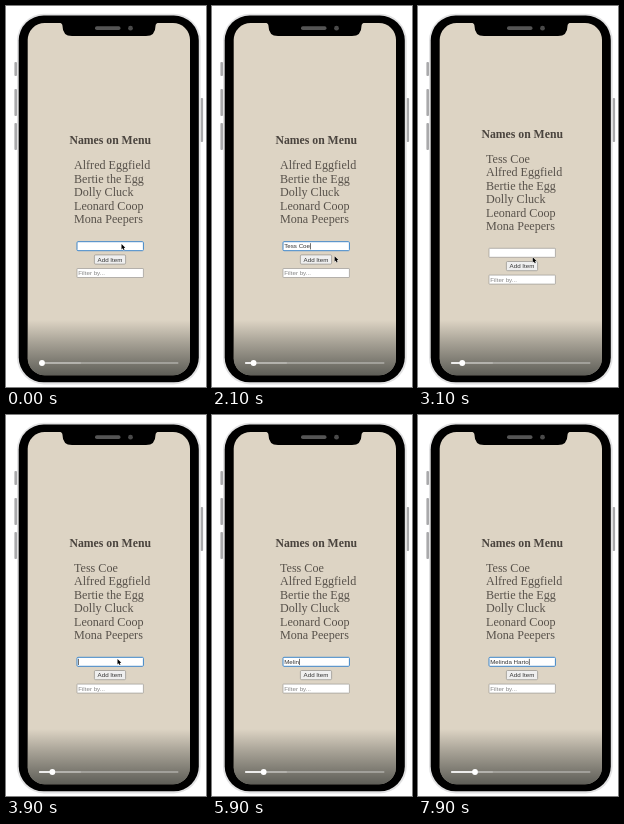
An HTML page with a canvas that plays this animation: 200 px wide and 381 px high, repeating every 8 s.

```html
<!DOCTYPE html>
<html lang="en">
<head>
<meta charset="utf-8">
<title>Names on Menu</title>
<style>
html, body { margin: 0; width: 100%; height: 100%; overflow: hidden; background: #fff; }
canvas { display: block; width: 200px; height: 381px; }
</style>
</head>
<body>
<canvas id="stage"></canvas>
<script>
const W = 200, H = 381, LOOP = 8000, STEP = 100;
const SERIF = '"Liberation Serif", "Times New Roman", serif';
const SANS = '"Liberation Sans", Arial, sans-serif';
const INK = '#58524b', HEAD_INK = '#4a443e';

const canvas = document.getElementById('stage');
const ratio = window.devicePixelRatio || 1;
canvas.width = W * ratio;
canvas.height = H * ratio;
const ctx = canvas.getContext('2d');
ctx.scale(ratio, ratio);

const people = ['Alfred Eggfield', 'Bertie the Egg', 'Dolly Cluck', 'Leonard Coop', 'Mona Peepers'];
const first = { text: 'Tess Coe', keys: [500, 600, 800, 900, 1100, 1300, 1500, 1600] };
const second = {
  text: 'Melinda Harto',
  keys: [4700, 5000, 5300, 5500, 5800, 6000, 6300, 6600, 6900, 7200, 7400, 7600, 7800]
};
const ADDED = 3000, BLUR = 2500, REFOCUS = 3700;

// Pointer stops: time, x, y
const stops = [[0, 115.5, 238], [500, 115.5, 238], [500, 0, -20], [1700, 0, -20],
               [1700, 134, 244], [2000, 124, 250], [2400, 115, 252], [3000, 115, 252],
               [3300, 114, 249], [3600, 111.5, 244], [4600, 111.5, 244]];

function box(x, y, w, h, r, fill) {
  ctx.beginPath();
  ctx.roundRect(x, y, w, h, r);
  ctx.fillStyle = fill;
  ctx.fill();
}

function frame(x, y, w, h, r, color, line) {
  ctx.beginPath();
  ctx.roundRect(x, y, w, h, r);
  ctx.strokeStyle = color;
  ctx.lineWidth = line;
  ctx.stroke();
}

function dot(x, y, r, fill) {
  ctx.beginPath();
  ctx.arc(x, y, r, 0, Math.PI * 2);
  ctx.fillStyle = fill;
  ctx.fill();
}

function label(text, x, y, font, color, align = 'left') {
  ctx.font = font;
  ctx.fillStyle = color;
  ctx.textAlign = align;
  ctx.fillText(text, x, y);
}

function drawPhone() {
  ctx.fillStyle = '#fff';
  ctx.fillRect(0, 0, W, H);
  for (const [x, y, h] of [[8.4, 56, 14], [8.4, 83, 27], [8.4, 117, 27], [194.5, 92, 44]]) {
    box(x, y, 2.6, h, 1, '#a9a9ab');
  }
  box(11, 7.8, 183.7, 370.6, 27, '#e2e2e3');
  box(12.7, 9.5, 180.1, 366.8, 25, '#000');
  box(21.7, 17, 162.3, 352.2, 17, '#ddd4c4');
}

function drawNotch() {
  ctx.beginPath();
  ctx.moveTo(53, 16.5);
  ctx.quadraticCurveTo(56.5, 17, 56.5, 20);
  ctx.quadraticCurveTo(56.5, 30, 66, 30);
  ctx.lineTo(140, 30);
  ctx.quadraticCurveTo(149.5, 30, 149.5, 20);
  ctx.quadraticCurveTo(149.5, 17, 153, 16.5);
  ctx.closePath();
  ctx.fillStyle = '#000';
  ctx.fill();
  box(89, 20.3, 25.5, 3.7, 1.8, '#555');
  dot(124.5, 22.2, 2.4, '#4a4a4a');
}

function drawPlayer(t) {
  ctx.save();
  ctx.beginPath();
  ctx.roundRect(21.7, 17, 162.3, 352.2, 17);
  ctx.clip();
  const shade = ctx.createLinearGradient(0, 314, 0, 369.5);
  shade.addColorStop(0, 'rgba(45,48,45,0)');
  shade.addColorStop(0.4, 'rgba(45,48,45,0.3)');
  shade.addColorStop(1, 'rgba(45,48,45,0.72)');
  ctx.fillStyle = shade;
  ctx.fillRect(21, 314, 164, 56);
  ctx.restore();
  const knob = 36 + 21 * t / 7900;
  box(33, 356.3, 139.5, 1.5, 0.7, 'rgba(255,255,255,0.4)');
  box(33, 356.3, 42, 1.5, 0.7, 'rgba(255,255,255,0.25)');
  box(33, 356.3, knob - 33, 1.5, 0.7, '#fff');
  dot(knob, 357, 2.9, '#fff');
}

function drawField(y, focused) {
  box(71, y, 66.4, 9, 0.5, '#fff');
  if (focused) frame(71, y, 66.4, 9, 1, '#3f86c8', 1);
  else frame(71, y, 66.4, 9, 0.5, '#9b9994', 0.7);
}

function typed(entry, t) {
  return entry.text.slice(0, entry.keys.filter(k => k <= t).length);
}

function drawForm(t, shift) {
  const focused = t < BLUR || t >= REFOCUS;
  const value = t < ADDED ? typed(first, t) : typed(second, t);
  const font = '6.2px ' + SANS;
  drawField(235.7 + shift, focused);
  label(value, 72.2, 242.4 + shift, font, '#333');
  if (focused && t >= 300) {
    const end = 72.4 + ctx.measureText(value).width;
    ctx.fillStyle = '#111';
    ctx.fillRect(end, 237.2 + shift, 0.6, 6.2);
  }
  box(88.4, 248.9 + shift, 31.2, 9.2, 1.2, '#efefef');
  frame(88.4, 248.9 + shift, 31.2, 9.2, 1.2, '#93908a', 0.7);
  label('Add Item', 104, 255.6 + shift, font, '#333', 'center');
  drawField(262.5 + shift, false);
  label('Filter by...', 72.2, 269.2 + shift, font, '#858585');
}

function drawList(t, shift) {
  const names = t < ADDED ? people : [first.text, ...people];
  label('Names on Menu', 104.2, 138.2 - shift, 'bold 11.75px ' + SERIF, HEAD_INK, 'center');
  names.forEach((name, i) => {
    label(name, 68, 163.4 - shift + i * 13.5, '12.1px ' + SERIF, INK);
  });
}

function pointerAt(t) {
  const i = stops.findIndex(stop => stop[0] > t);
  if (i < 1) return null;
  const [t0, x0, y0] = stops[i - 1], [t1, x1, y1] = stops[i];
  const p = (t - t0) / (t1 - t0), e = p * p * (3 - 2 * p);
  return [x0 + (x1 - x0) * e, y0 + (y1 - y0) * e];
}

function drawPointer(t) {
  const at = pointerAt(t);
  if (!at) return;
  ctx.save();
  ctx.translate(at[0], at[1]);
  ctx.beginPath();
  ctx.moveTo(0, 0);
  for (const [x, y] of [[0, 5.4], [1.2, 4.3], [2, 6.1], [3, 5.7], [2.2, 3.9], [3.8, 3.8]]) ctx.lineTo(x, y);
  ctx.closePath();
  ctx.strokeStyle = '#fff';
  ctx.lineWidth = 0.8;
  ctx.stroke();
  ctx.fillStyle = '#000';
  ctx.fill();
  ctx.restore();
}

function draw(now) {
  const t = Math.floor((now % LOOP) / STEP) * STEP;
  const shift = t < ADDED ? 0 : 6.6;
  drawPhone();
  drawList(t, shift);
  drawForm(t, shift);
  drawPointer(t);
  drawPlayer(t);
  drawNotch();
}

let start;
function tick(now) {
  if (start === undefined) start = now;
  draw(Math.max(0, now - start));
  requestAnimationFrame(tick);
}
requestAnimationFrame(tick);
</script>
</body>
</html>
```
